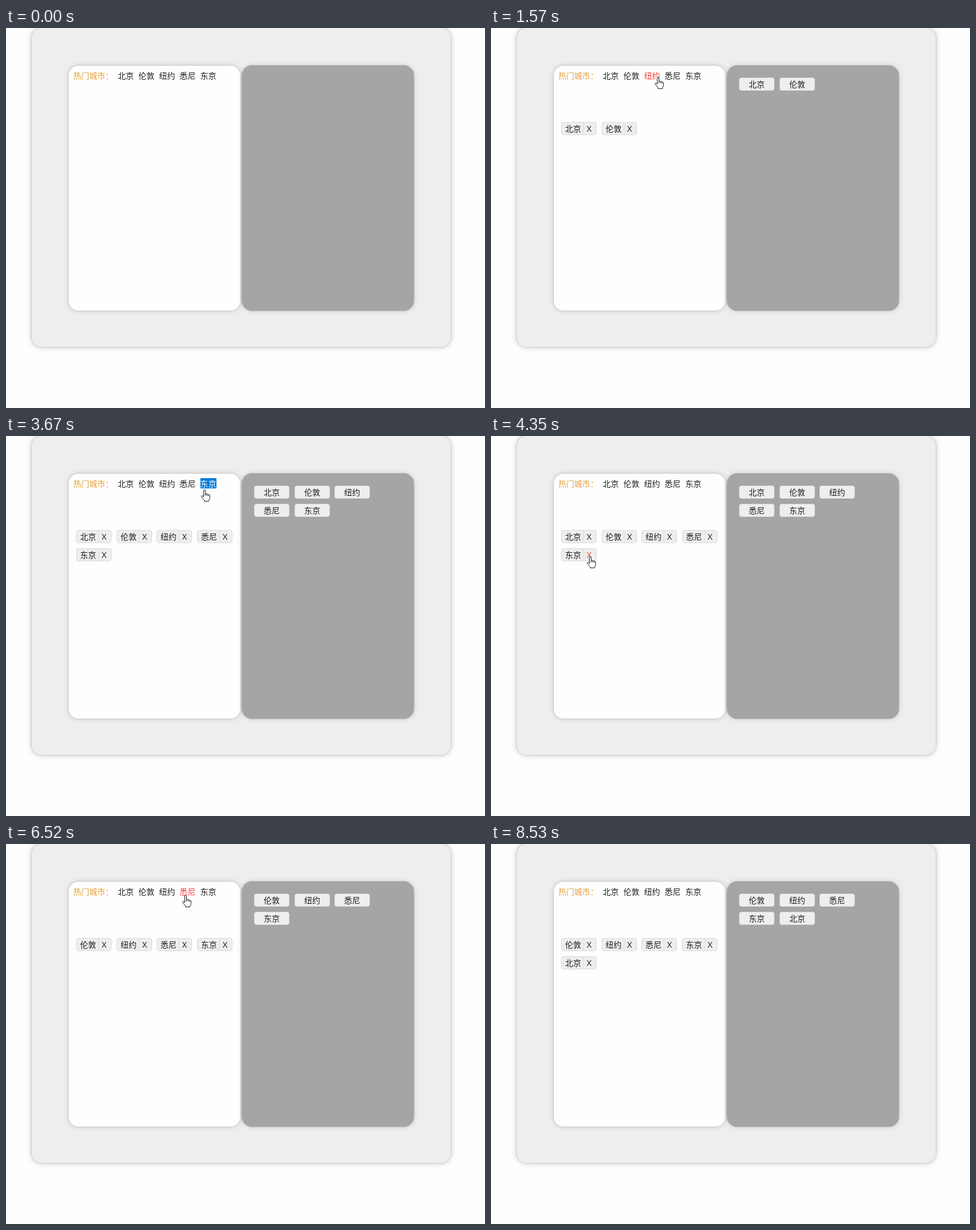
Animation, 840 px wide and 667 px high, one loop 8990 ms. Source, as an HTML page:

```html
<!DOCTYPE html>
<html lang="zh-CN">
<head>
<meta charset="utf-8">
<title>热门城市</title>
<style>
html, body { margin: 0; width: 100%; height: 100%; overflow: hidden; background: #fefefe; }
svg { display: block; width: 840px; height: 667px; }
text { font: 300 14px "Noto Sans CJK SC", "Noto Sans CJK", sans-serif; white-space: pre; fill: #1c1c1c; }
.outer { fill: #eee; stroke: #ccc; filter: drop-shadow(0 0 5px rgba(0,0,0,.2)); }
.card { stroke: #c8c8c8; filter: drop-shadow(0 0 4px rgba(0,0,0,.13)); }
.dark { fill: #a5a5a5; stroke: #b4b4b4; }
.light { fill: #fefefe; }
.title { fill: #e6a23c; }
.tag { fill: #eee; stroke: #dadada; }
.close { font: 15px "Open Sans", sans-serif; text-anchor: middle; }
.over { fill: #f0403c; }
.picked { fill: #fff; }
.cursor path { fill: #fff; stroke: #15151f; stroke-linejoin: round; }
.cursor .line { fill: none; }
</style>
</head>
<body>
<svg viewBox="0 0 840 667">
  <rect class="outer" x="44.5" y="-.5" width="736" height="561" rx="18"/>
  <rect class="card light" x="109.5" y="65.5" width="302" height="431" rx="18"/>
  <rect class="card dark" x="413.5" y="65.5" width="302" height="431" rx="18"/>
  <text class="title" x="118" y="89">热门城市：</text>
  <rect id="mark" x="341" y="74" width="28" height="18" fill="#0078d7"/>
  <g id="words"></g>
  <g id="tags"></g>
  <g id="labels"></g>
  <g id="hand" class="cursor">
    <path d="M-1.5 13V2Q-1.5 .5 0 .5Q1.5 .5 1.5 2V7.5Q3.2 6.5 4.4 7.9Q6.1 7.2 7 8.8Q9.5 8.5 9.5 11V14.5Q9.5 17 7.5 19V20.5H0V19L-5 13Q-6 11.3 -4.5 10.7Q-3 10.5 -1.5 13Z"/>
    <path class="line" d="M1.5 7.5V11M4.4 7.9V11M7 8.8V11.5"/>
  </g>
  <g id="arrow" class="cursor">
    <path d="M.5 .5V16.5L4.2 13L6.6 18.5L9 17.5L6.6 12.2H11.5Z"/>
  </g>
</svg>
<script>
const LOOP = 8990, FRAME = 77;
const CITIES = ['北京', '伦敦', '纽约', '悉尼', '东京'];

const wordX = i => 196 + 36.2 * i;
const cell = (x, y, cols) => i =>
  [Math.round(x + 70.6 * (i % cols)), y + 32 * Math.floor(i / cols)];
const tagCell = cell(123, 165, 4), labelCell = cell(435, 87, 3);

// Places the pointer visits; a click there edits the list.
const spot = (x, y) => ({ x, y });
const word = (i, dx = 17, y = 86) =>
  ({ x: wordX(i) + dx, y, edit: list => [...list, i] });
const close = i => {
  const [x, y] = tagCell(i);
  return { x: x + 51, y: y + 14, edit: list => list.filter((_, k) => k !== i) };
};

// Each visit: departure, arrival, place, click time.
const ENTRY = spot(768, 597);
const VISITS = [
  [70, 270, spot(262, 121)],
  [420, 730, word(0), 960],
  [1040, 1270, word(1), 1420],
  [1500, 1570, word(2, 25), 1870],
  [1950, 2270, word(3), 2340],
  [2420, 2570, word(4), 2740],
  [3670, 4120, spot(175, 235)],
  [4200, 4350, close(4), 4520],
  [4900, 5280, close(0), 5360],
  [5440, 5670, word(4), 5820],
  [5900, 6370, word(3, 10, 90)],
  [6520 + FRAME, 6680, word(2)],
  [6910, 7140, word(1)],
  [7290, 7600, word(0), 7750],
  [7920, 8450, spot(753, 633)]
];
const ENTER = 70, LEAVE = 8530;
const SELECT = 2890, DESELECT = 4340;

const $ = id => document.getElementById(id);

function add(parent, name, attrs, content = '') {
  const el = document.createElementNS('http://www.w3.org/2000/svg', name);
  for (const key in attrs) el.setAttribute(key, attrs[key]);
  el.textContent = content;
  return parent.appendChild(el);
}

const show = (el, on) => el.setAttribute('visibility', on ? 'visible' : 'hidden');

function makeTag(parent, [x, y], dx) {
  const g = add(parent, 'g', {});
  add(g, 'rect', { class: 'tag', x: x + .5, y: y + .5, width: 61, height: 22, rx: 3.5 });
  return { g, x, y, name: add(g, 'text', { x: x + dx, y: y + 17 }) };
}

const words = CITIES.map((city, i) => add($('words'), 'text', { x: wordX(i), y: 89 }, city));
const labels = CITIES.map((_, i) => makeTag($('labels'), labelCell(i), 17));
const tags = CITIES.map((_, i) => {
  const tag = makeTag($('tags'), tagCell(i), 7);
  const { g, x, y } = tag;
  add(g, 'path', { d: `M${x + 39.5} ${y + 1}v21`, stroke: '#dadada' });
  tag.close = add(g, 'text', { class: 'close', x: x + 49, y: y + 17 }, 'X');
  return tag;
});

const listAt = t => VISITS.reduce(
  (list, [, , place, click]) => click <= t ? place.edit(list) : list, []);

function pointerAt(t) {
  const i = VISITS.filter(v => v[0] <= t).length - 1;
  if (i < 0) return ENTRY;
  const [start, end, to] = VISITS[i];
  const from = i ? VISITS[i - 1][2] : ENTRY;
  const steps = Math.max(1, Math.round((end - start) / FRAME));
  const done = Math.min(steps, Math.floor((t - start) / (end - start) * steps + .05));
  const p = (done + 1) / (steps + 1), e = p * p * (3 - 2 * p);
  return {
    x: Math.round(from.x + (to.x - from.x) * e),
    y: Math.round(from.y + (to.y - from.y) * e)
  };
}

function draw(t) {
  const list = listAt(t), { x: px, y: py } = pointerAt(t);
  const visible = t >= ENTER && t < LEAVE;
  const selected = t >= SELECT && t < DESELECT;
  let link = false;

  function hover(el, x, y, w, h, on) {
    const over = on && px >= x && px < x + w && py >= y && py < y + h;
    el.classList.toggle('over', over);
    link = link || over;
  }

  words.forEach((el, i) => {
    hover(el, wordX(i), 74, 28, 21, visible);
    el.classList.toggle('picked', selected && i === 4);
  });
  show($('mark'), selected);

  [...tags, ...labels].forEach(({ g, name }, k) => {
    const city = CITIES[list[k % CITIES.length]];
    show(g, city);
    name.textContent = city || '';
  });
  tags.forEach(({ x, y, close }, i) =>
    hover(close, x + 40, y, 22, 23, visible && i < list.length));

  for (const id of ['hand', 'arrow']) {
    $(id).setAttribute('transform', `translate(${px} ${py})`);
    show($(id), visible && link === (id === 'hand'));
  }
}

const begin = performance.now();
function tick() {
  draw((performance.now() - begin) % LOOP);
  requestAnimationFrame(tick);
}
tick();
</script>
</body>
</html>
```
